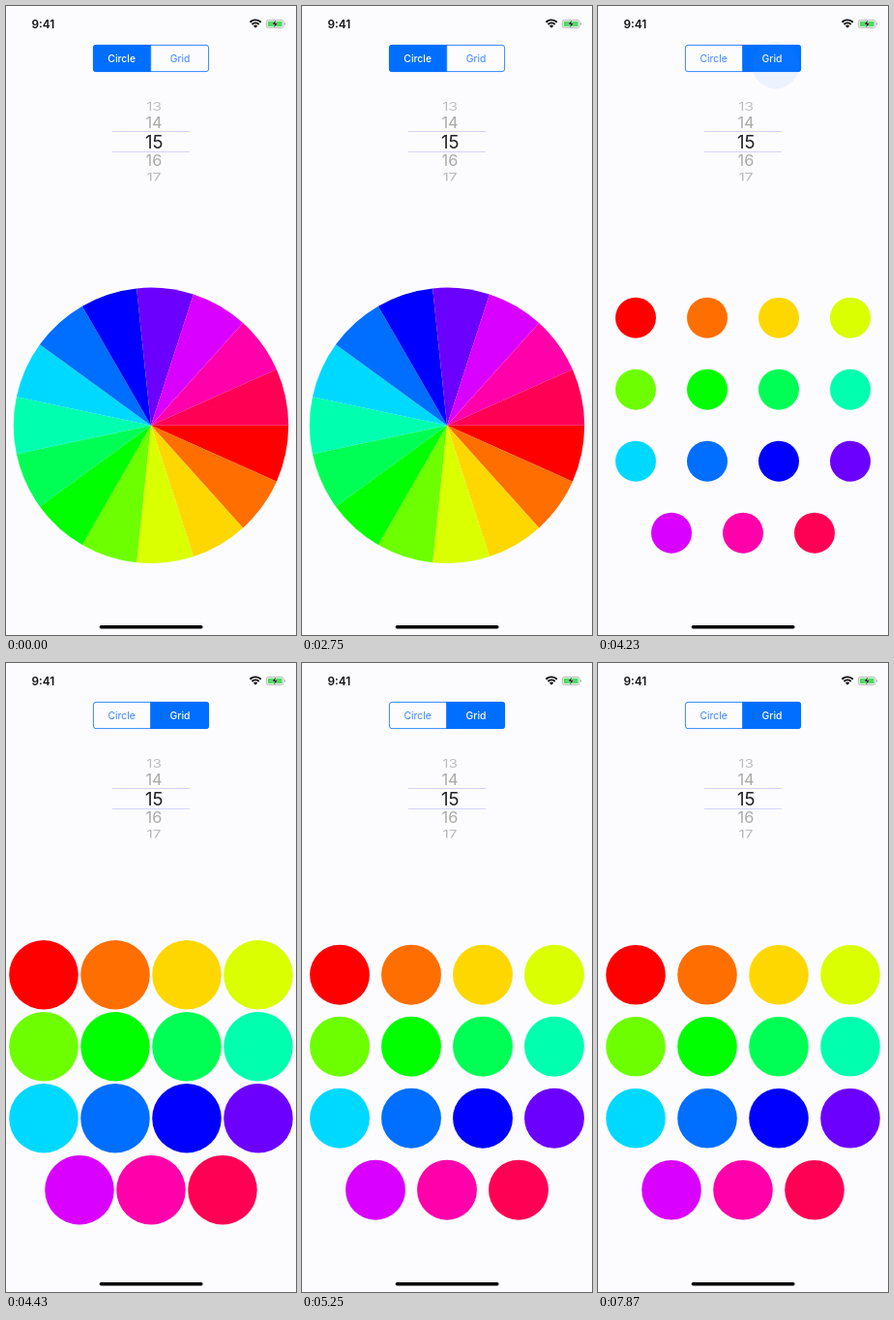
An HTML page that plays this animation: 300 by 649 pixels, repeating every 8000 ms.

```html
<!DOCTYPE html>
<html lang="en">
<head>
<meta charset="utf-8">
<title>Colour wheel and grid</title>
<style>
  html, body { margin: 0; width: 100%; height: 100%; overflow: hidden; background: #fcfcff; }
  svg { display: block; width: 100vw; height: 100vh; }
  text { font-family: Inter, Roboto, sans-serif; text-anchor: middle; }
</style>
</head>
<body>
<svg id="stage" viewBox="0 0 300 649">
  <defs>
    <clipPath id="drum"><rect x="110" y="98.5" width="80" height="82"/></clipPath>
    <clipPath id="tabs"><rect x="90" y="40" width="120" height="28" rx="3"/></clipPath>
  </defs>
  <rect width="300" height="649" fill="#fcfcff"/>

  <!-- status bar -->
  <text x="38.3" y="22.6" font-size="11.8" font-weight="600" fill="#111">9:41</text>
  <g fill="none" stroke="#111" stroke-width="1.9">
    <path d="M252.4 16.7a8.2 8.2 0 0 1 11.4 0"/>
    <path d="M254.5 19a5.2 5.2 0 0 1 7.2 0"/>
  </g>
  <path d="M256 20.6a3 3 0 0 1 4.2 0L258.1 22.8Z" fill="#111"/>
  <rect x="269.4" y="14.4" width="17.6" height="8.2" rx="2.2" fill="none" stroke="#aaa" stroke-width=".8"/>
  <rect x="270.7" y="15.7" width="15" height="5.6" rx="1" fill="#4cd964"/>
  <path d="M288 17v3q1-.4 1-1.5t-1-1.5Z" fill="#aaa"/>
  <path d="M279.4 14.2L275 19H277.8L276.8 22.8L281.4 17.8H278.5Z" fill="#111" stroke="#fcfcff" stroke-width=".4"/>

  <!-- segmented control -->
  <g clip-path="url(#tabs)">
    <rect id="leftTab" x="90" y="40" width="60" height="28"/>
    <rect id="rightTab" x="149.5" y="40" width="60.5" height="28"/>
  </g>
  <path d="M149.7 40V68" stroke="#006eff" stroke-width=".8"/>
  <rect x="90.4" y="40.4" width="119.2" height="27.2" rx="2.6" fill="none" stroke="#006eff" stroke-width=".8"/>
  <text id="leftText" x="119.7" y="57.8" font-size="10.4">Circle</text>
  <text id="rightText" x="180" y="57.8" font-size="10.4">Grid</text>

  <!-- number picker -->
  <g clip-path="url(#drum)">
    <text transform="translate(153 108.3) scale(1 .72)" font-size="15.4" fill="#bebec0">13</text>
    <text transform="translate(153 126.3) scale(1 .93)" font-size="16.4" fill="#a9a9a6">14</text>
    <text x="153.3" y="147" font-size="18.6" fill="#222">15</text>
    <text transform="translate(153 165.4) scale(1 .93)" font-size="16.4" fill="#a9a9a6">16</text>
    <text transform="translate(153 181) scale(1 .76)" font-size="15.4" fill="#b8b8b8">17</text>
  </g>
  <path d="M110 129.5H190M110 150.5H190" stroke="#d0cffa" stroke-width=".9"/>

  <g id="wheel"></g>
  <g id="grid"></g>
  <circle id="touch" cx="183.8" cy="61.2" r="24.2" fill="#4a95ff"/>
  <rect x="96.6" y="639" width="107" height="3.6" rx="1.8" fill="#000"/>
</svg>
<script>
const LOOP = 8000, PRESS = 3950, SWITCH = 4055;
const BLUE = '#006eff', PALE = '#fcfcff';
const COLORS = ['#f00', '#ff6e00', '#ffd700', '#d9ff00', '#6dff00',
  '#0f0', '#0f5', '#00ffaf', '#00d9ff', '#006eff',
  '#00f', '#6c00ff', '#d900ff', '#f0a', '#f05'];

const $ = id => document.getElementById(id);
const clamp = v => Math.max(0, Math.min(1, v));

function add(parent, tag, attrs) {
  const el = document.createElementNS('http://www.w3.org/2000/svg', tag);
  for (const key in attrs) el.setAttribute(key, attrs[key]);
  return parent.appendChild(el);
}

function rim(i) {
  const a = i / COLORS.length * Math.PI * 2;
  return `${150 + 142.2 * Math.cos(a)} ${432.8 + 142.2 * Math.sin(a)}`;
}

COLORS.forEach((fill, i) => add($('wheel'), 'path', {
  d: `M150 432.8L${rim(i)}A142.2 142.2 0 0 1 ${rim(i + 1)}Z`, fill
}));

const dots = COLORS.map((fill, i) => {
  const row = Math.floor(i / 4);
  const left = row === 3 ? 76 : 39;
  return add($('grid'), 'circle', { cx: left + i % 4 * 74, cy: 321.7 + row * 74, fill });
});

// Underdamped spring from 0 to 1, damping ratio 0.5
function spring(ms) {
  const decay = 4.65, freq = decay * Math.sqrt(3), t = ms / 1000;
  return 1 - Math.exp(-decay * t) * (Math.cos(freq * t) + decay / freq * Math.sin(freq * t));
}

function paintTab(side, on, idle) {
  $(side + 'Tab').setAttribute('fill', on ? BLUE : idle);
  $(side + 'Text').setAttribute('fill', on ? '#fff' : '#3a87ff');
  $(side + 'Text').setAttribute('font-weight', on ? 500 : 400);
}

function draw(t) {
  const isGrid = t >= SWITCH;
  const pressed = t >= PRESS && !isGrid;
  paintTab('left', !isGrid, PALE);
  paintTab('right', isGrid, pressed ? '#d5f0ff' : PALE);

  $('wheel').style.display = isGrid ? 'none' : '';
  $('grid').style.display = isGrid ? '' : 'none';
  if (isGrid) {
    const r = Math.max(0, 30.8 * spring(t - SWITCH));
    dots.forEach(dot => dot.setAttribute('r', r));
  }

  const fade = clamp((t - PRESS) / 60) * (1 - clamp((t - SWITCH) / 200));
  $('touch').setAttribute('opacity', 0.72 * fade);
}

const start = performance.now();
function tick() {
  draw((performance.now() - start) % LOOP);
  requestAnimationFrame(tick);
}
tick();
</script>
</body>
</html>
```
